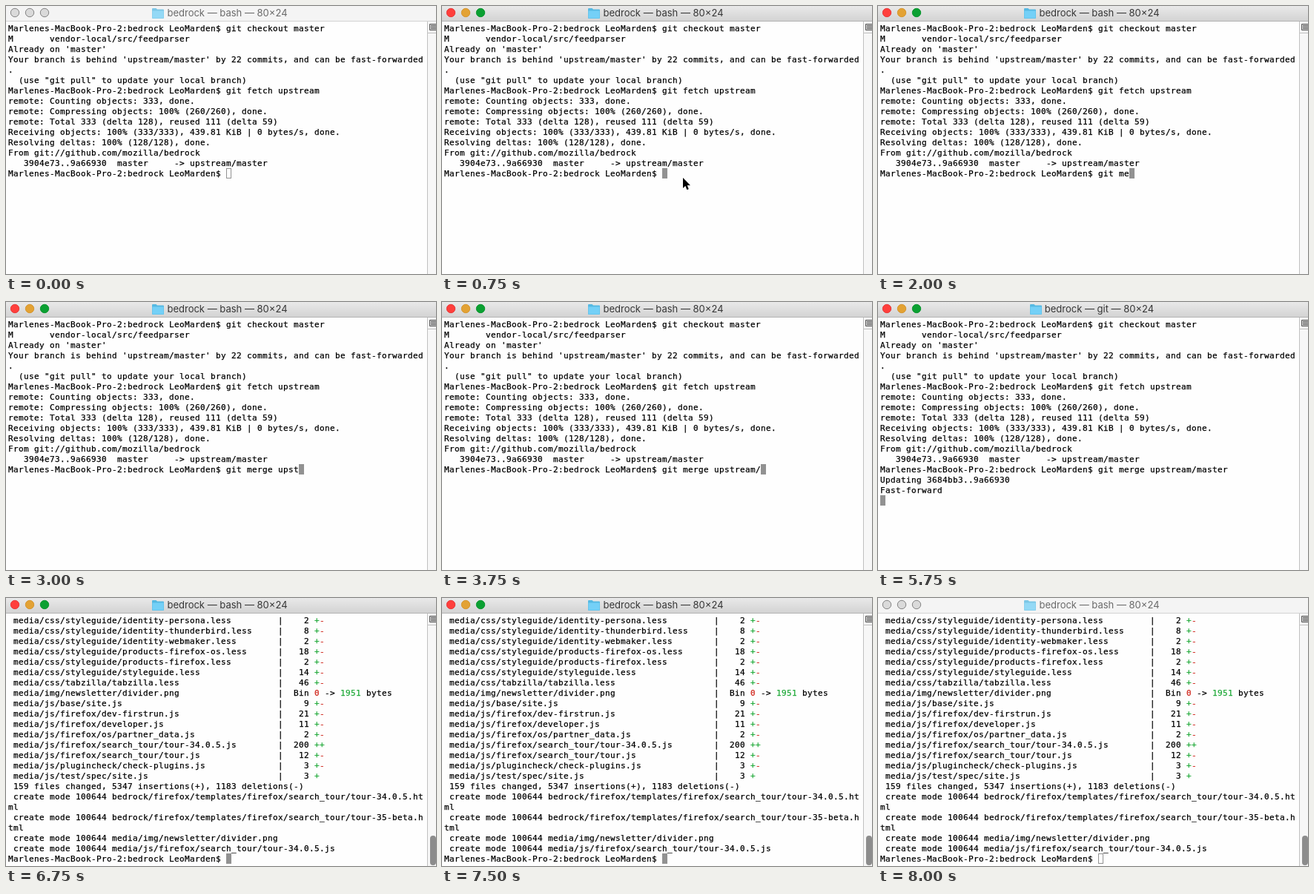
Recreate the animation shown at these times as an HTML page. Size 580 by 362 pixels, loop 8.75 s.

```html
<!DOCTYPE html>
<html lang="en">
<head>
<meta charset="utf-8">
<title>Terminal</title>
<style>
  html, body { margin: 0; width: 100%; height: 100%; overflow: hidden; background: #fff; }
  #win { position: relative; width: 580px; height: 362px; overflow: hidden; background: #fefefe; }

  #bar {
    position: absolute; inset: 0 0 auto; height: 21px;
    background: linear-gradient(#e9e9e9, #d3d3d3); border-bottom: 1px solid #b4b4b4;
    box-sizing: border-box;
  }
  #lights { position: absolute; left: 0; top: 0; stroke-width: 1; }
  #lights :nth-child(1) { fill: #ff3f3c; stroke: #e8393a; }
  #lights :nth-child(2) { fill: #e3a234; stroke: #d6962e; }
  #lights :nth-child(3) { fill: #0ba032; stroke: #0a962f; }
  #title {
    position: absolute; left: 0; top: 0; width: 577px; height: 19px;
    display: flex; align-items: center; justify-content: center; gap: 4px;
    font: 13px/19px Inter, "Liberation Sans", sans-serif; color: #363636; white-space: pre;
  }

  .blur #bar { background: #f4f4f4; border-color: #d2d2d2; }
  .blur #lights circle { fill: #dadada; stroke: #858585; }
  .blur #title { color: #6a6a6a; }
  .blur #title svg { opacity: .75; }

  #text {
    position: absolute; left: 3px; top: 24px; margin: 0; color: #000;
    font: 11px/14px "DejaVu Sans Mono", Menlo, monospace;
    letter-spacing: calc(7px - 1ch); -webkit-text-stroke: .25px;
  }
  #text i { font-style: normal; color: #1ca836; }
  #text b { font-weight: normal; color: #d0271d; }

  #caret { position: absolute; width: 7px; height: 14px; box-sizing: border-box; background: #929292; }
  .blur #caret { background: none; border: 1px solid #929292; }

  #track {
    position: absolute; left: 568px; top: 21px; width: 12px; height: 341px;
    box-sizing: border-box; background: #f7f7f7; border-left: 1px solid #c0c0c0;
  }
  #split { position: absolute; left: 569px; top: 21px; }
  #thumb {
    position: absolute; left: 572px; top: 321px; width: 8px; height: 40px;
    border-radius: 4px; background: #8c8c8c;
  }
  #mouse { position: absolute; overflow: visible; }
</style>
</head>
<body>
<div id="win">
  <div id="bar">
    <svg id="lights" width="64" height="19">
      <circle cx="12" cy="9" r="5.7"/><circle cx="32" cy="9" r="5.7"/><circle cx="52" cy="9" r="5.7"/>
    </svg>
    <div id="title">
      <svg width="16" height="16">
        <path d="M0 2Q0 1 1 1H5.5L7 2.5H15Q16 2.5 16 3.5V14Q16 15 15 15H1Q0 15 0 14Z" fill="#56b9e2"/>
        <path d="M.5 4.5H15.5V14.5H.5Z" fill="#74d0f7"/>
      </svg><span id="name"></span>
    </div>
  </div>
  <div id="track"></div>
  <svg id="split" width="11" height="16">
    <path d="M0 15.5H11" stroke="#c0c0c0"/>
    <path d="M11 3.5H2.5V11.5H11" fill="#d6d6d6" stroke="#555"/>
    <path d="M4 5.5H11M4 7.5H11M4 9.5H11" stroke="#555"/>
  </svg>
  <div id="thumb"></div>
  <pre id="text"></pre>
  <div id="caret"></div>
  <svg id="mouse" width="12" height="18">
    <path d="M0 0V14L3.3 11L5.4 16.2L7.8 15.2L5.7 10.2H10Z" stroke="#fff" stroke-width="2"/>
    <path d="M0 0V14L3.3 11L5.4 16.2L7.8 15.2L5.7 10.2H10Z"/>
  </svg>
</div>
<script>
const LOOP = 8750;
const $ = id => document.getElementById(id);
const prompt = "Marlenes-MacBook-Pro-2:bedrock LeoMarden$ ";
const command = "git merge upstream/master";

const history = `${prompt}git checkout master
M       vendor-local/src/feedparser
Already on 'master'
Your branch is behind 'upstream/master' by 22 commits, and can be fast-forwarded
.
  (use "git pull" to update your local branch)
${prompt}git fetch upstream
remote: Counting objects: 333, done.
remote: Compressing objects: 100% (260/260), done.
remote: Total 333 (delta 128), reused 111 (delta 59)
Receiving objects: 100% (333/333), 439.81 KiB | 0 bytes/s, done.
Resolving deltas: 100% (128/128), done.
From git://github.com/mozilla/bedrock
   3904e73..9a66930  master     -> upstream/master
${prompt}`;

const paint = s => s.replace(/\++/g, "<i>$&</i>").replace(/-+/g, "<b>$&</b>");
const stat = (file, tail) => ` ${file}`.padEnd(52) + "| " + tail;
const count = (file, n, marks = "+-") => stat(file, `${n}`.padStart(4) + " " + paint(marks));

const summary = [
  count("media/css/styleguide/identity-persona.less", 2),
  count("media/css/styleguide/identity-thunderbird.less", 8),
  count("media/css/styleguide/identity-webmaker.less", 2),
  count("media/css/styleguide/products-firefox-os.less", 18),
  count("media/css/styleguide/products-firefox.less", 2),
  count("media/css/styleguide/styleguide.less", 14),
  count("media/css/tabzilla/tabzilla.less", 46),
  stat("media/img/newsletter/divider.png", " Bin <b>0</b> -&gt; <i>1951</i> bytes"),
  count("media/js/base/site.js", 9),
  count("media/js/firefox/dev-firstrun.js", 21),
  count("media/js/firefox/developer.js", 11),
  count("media/js/firefox/os/partner_data.js", 2),
  count("media/js/firefox/search_tour/tour-34.0.5.js", 200, "++"),
  count("media/js/firefox/search_tour/tour.js", 12),
  count("media/js/plugincheck/check-plugins.js", 3),
  count("media/js/test/spec/site.js", 3, "+"),
  " 159 files changed, 5347 insertions(+), 1183 deletions(-)",
  " create mode 100644 bedrock/firefox/templates/firefox/search_tour/tour-34.0.5.ht",
  "ml",
  " create mode 100644 bedrock/firefox/templates/firefox/search_tour/tour-35-beta.h",
  "tml",
  " create mode 100644 media/img/newsletter/divider.png",
  " create mode 100644 media/js/firefox/search_tour/tour-34.0.5.js",
  prompt
].join("\n");

// [start time, characters typed]
const typing = [[0, 0], [1500, 1], [1750, 4], [2000, 6], [2250, 8], [2500, 10], [2750, 11],
  [3000, 14], [3250, 16], [3500, 18], [3750, 19], [4250, 20], [4500, 22], [4750, 24], [5000, 25]];
// [start time, x, y]
const moves = [[250, 325, 222], [500, 315, 236], [750, 325, 232]];

const latest = (steps, t) => steps.filter(s => s[0] <= t).pop();

function screen(t) {
  if (t >= 6750) return summary;
  let out = history + command.slice(0, latest(typing, t)[1]);
  if (t >= 5250) out += "\nUpdating 3684bb3..9a66930\n";
  if (t >= 5750) out += "Fast-forward\n";
  return out;
}

let shown;
function draw(t) {
  const out = screen(t);
  if (out !== shown) {
    shown = out;
    $("text").innerHTML = out;
    const lines = out.split("\n");
    $("caret").style.left = 3 + 7 * lines[lines.length - 1].length + "px";
    $("caret").style.top = 23 + 14 * (lines.length - 1) + "px";
  }
  $("win").className = t < 750 || t >= 8000 ? "blur" : "";
  $("name").textContent = `bedrock — ${t >= 5250 && t < 6750 ? "git" : "bash"} — 80×24`;
  $("thumb").hidden = t < 6750;

  const at = t < 1000 && latest(moves, t);
  $("mouse").style.display = at ? "" : "none";
  if (at) {
    $("mouse").style.left = at[1] + "px";
    $("mouse").style.top = at[2] + "px";
  }
}

const start = performance.now();
function tick() {
  draw((performance.now() - start) % LOOP);
  requestAnimationFrame(tick);
}
tick();
</script>
</body>
</html>
```
